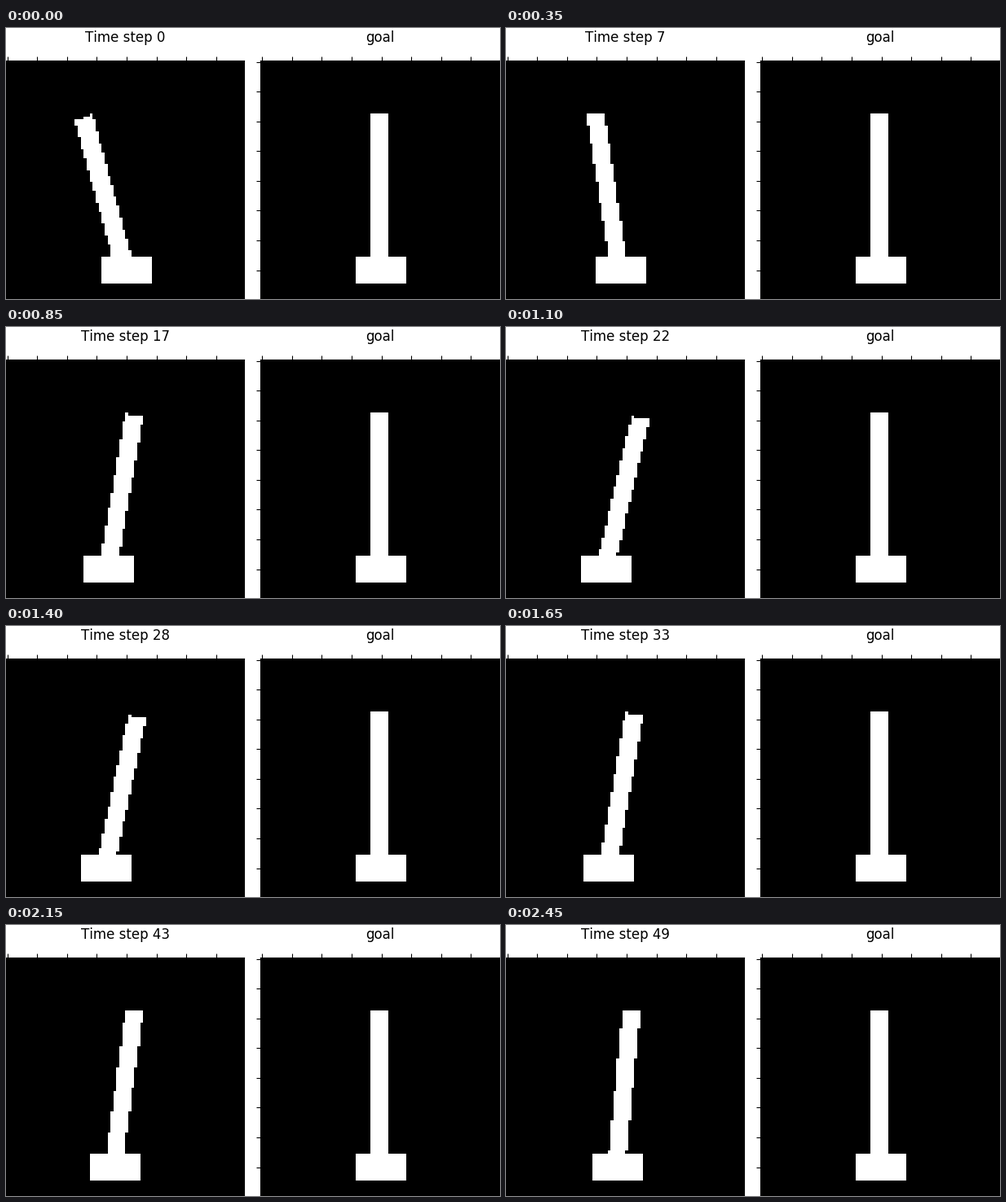
Animation, 606 px wide and 333 px high, one loop 2500 ms. Source, as a matplotlib script:

```python
import math

import numpy as np
import matplotlib.pyplot as plt
from matplotlib.animation import FuncAnimation

plt.rcParams["font.family"] = "DejaVu Sans"
plt.rcParams["text.kerning_factor"] = 6   # classic letter spacing

W, H, DPI = 606, 333, 100
FRAMES, INTERVAL = 50, 50
CELLS = 80            # the camera image is CELLS x CELLS
SIDE = 292.73         # panel side in pixels
BOTTOM = 0.58         # panel bottom in pixels
LEFT_X, RIGHT_X = -0.25, 312.4

POLE = 52             # pole length in cells
HALF = 2.5            # half of the pole width
AXLE = 70             # row of the axle

# Motion through a few poses: time step, cart centre, sideways lean of the tip.
STEPS = np.array([0, 7, 11, 17, 22, 28, 33, 38, 44, 49], float)
CART = np.array([40.1, 38.4, 36.6, 34.1, 33.1, 33.1, 33.8, 34.8, 35.9, 36.8])
LEAN = np.array([-14, -8, -2, 9, 12, 11, 9.4, 8, 6.5, 5])


def smooth(t, values):
    """Cubic Hermite curve through the poses."""
    slopes = np.gradient(values, STEPS, edge_order=2)
    i = min(max(np.searchsorted(STEPS, t, side="right") - 1, 0), len(STEPS) - 2)
    span = STEPS[i + 1] - STEPS[i]
    u = (t - STEPS[i]) / span
    return ((1 + 2 * u) * (1 - u) ** 2 * values[i]
            + u * (1 - u) ** 2 * span * slopes[i]
            + u * u * (3 - 2 * u) * values[i + 1]
            + u * u * (u - 1) * span * slopes[i + 1])


def nearest(x):
    return math.floor(x + 0.5)


def fill_polygon(img, points):
    """Scanline fill of a convex polygon with whole-cell corners."""
    edges = list(zip(points, points[1:] + points[:1]))
    ys = [y for _, y in points]
    for row in range(min(ys), max(ys) + 1):
        hits = []
        for (x0, y0), (x1, y1) in edges:
            if y0 == y1 == row:
                hits += [x0, x1]
            elif y0 != y1 and min(y0, y1) <= row <= max(y0, y1):
                hits.append(x0 + (x1 - x0) * (row - y0) / (y1 - y0))
        first, last = nearest(min(hits)), math.ceil(max(hits) - 0.5)
        img[row, first:last + 1] = 1


def draw_scene(cart, lean):
    img = np.zeros((CELLS, CELLS))
    x = nearest(cart)
    shift = nearest(lean)
    height = math.ceil(math.sqrt(POLE ** 2 - lean ** 2))
    tilt = HALF * lean / POLE
    lx, ly = x - 3, nearest(AXLE + 0.09 - tilt)
    rx, ry = x + 2, nearest(AXLE + 0.09 + tilt)
    fill_polygon(img, [(lx, ly), (lx + shift, ly - height),
                       (rx + shift, ry - height), (rx, ry)])
    img[AXLE - 4:AXLE + 5, x - 8:x + 9] = 1
    return img


fig = plt.figure(figsize=(W / DPI, H / DPI), dpi=DPI, facecolor="white")


def add_panel(x, img, title):
    ax = fig.add_axes([x / W, BOTTOM / H, SIDE / W, SIDE / H])
    picture = ax.imshow(img, cmap="gray", vmin=0, vmax=1,
                        interpolation="nearest", aspect="auto")
    ax.set_xticks(range(0, CELLS, 10))
    ax.set_yticks(range(0, CELLS, 10))
    ax.tick_params(top=True, bottom=False, left=True, labelleft=False,
                   labelbottom=False, length=3.5, width=0.8)
    label = fig.text((x + SIDE / 2) / W, 1 - 17 / H, title, fontsize=12,
                     ha="center", va="baseline")
    return picture, label


scene, caption = add_panel(LEFT_X, draw_scene(CART[0], LEAN[0]), "Time step 0")
add_panel(RIGHT_X, draw_scene(40, 0), "goal")


def update(step):
    scene.set_data(draw_scene(smooth(step, CART), smooth(step, LEAN)))
    caption.set_text(f"Time step {step}")
    return scene, caption


anim = FuncAnimation(fig, update, frames=FRAMES, interval=INTERVAL, repeat=True)
plt.show()
```
